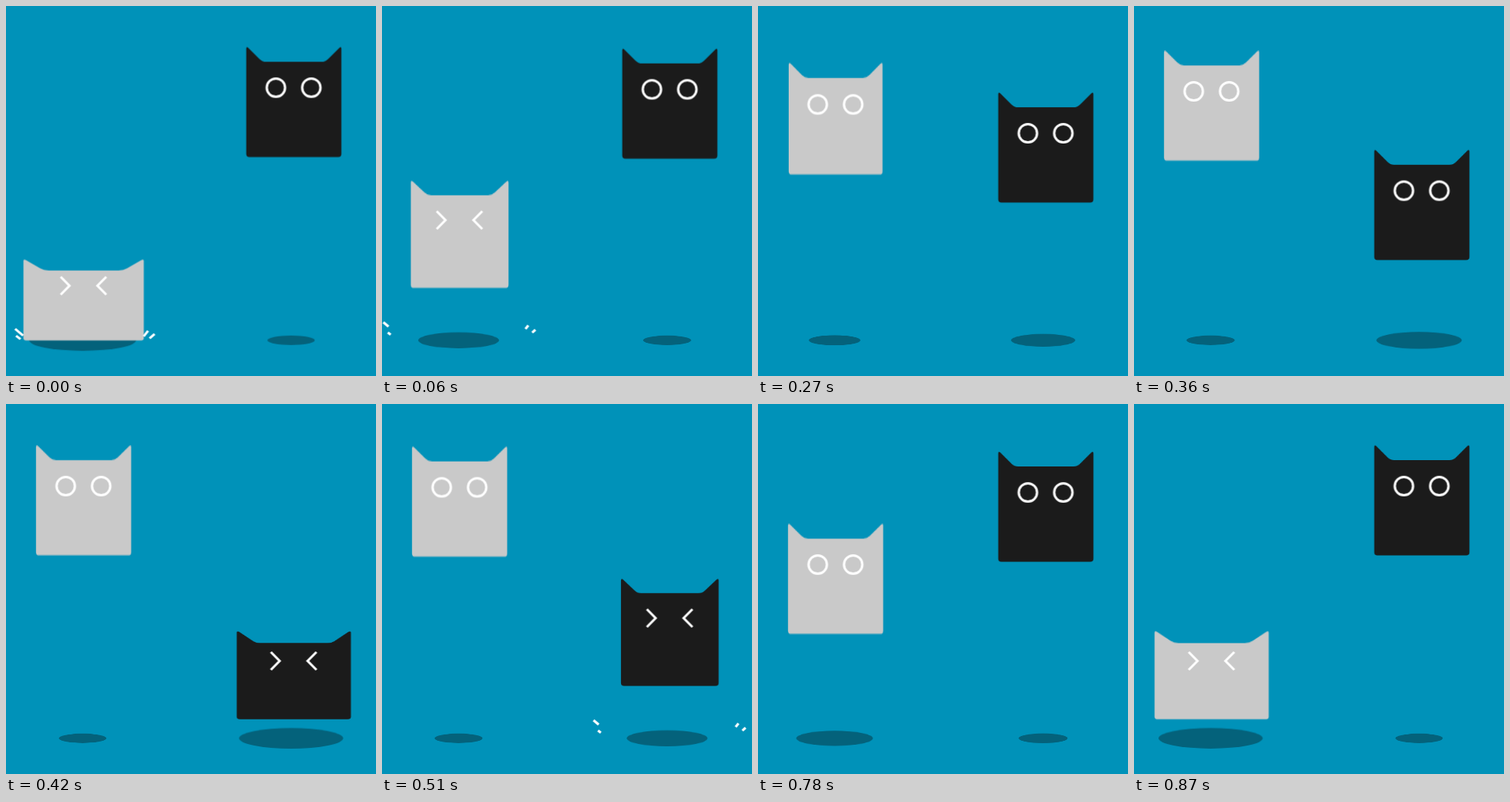
Write an HTML page that moves like this. It is 469 px wide and 468 px high and loops after 900 ms.

```html
<!DOCTYPE html>
<html lang="en">
<head>
<meta charset="utf-8">
<title>Two jumping cats</title>
<style>
  html, body { margin: 0; width: 100%; height: 100%; overflow: hidden; background: #0092b9; }
  svg { display: block; width: 100%; height: 100%; }
  .line { fill: none; stroke: #fff; stroke-width: 3; }
  .shadow { fill: #04627b; }
</style>
</head>
<body>
<svg id="stage" viewBox="0 0 469 468"></svg>
<script>
const LOOP = 900;
const APEX = 121.5, FLOOR = 372, GROUND = 422.8;
const NS = 'http://www.w3.org/2000/svg';
const stage = document.getElementById('stage');

const BODY = 'M-60.3 -67.5 Q-60.3 -71 -57.6 -68.6 L-43.5 -54.6 Q-40 -51 -35 -51' +
  ' H35 Q40 -51 43.5 -54.6 L57.6 -68.6 Q60.3 -71 60.3 -67.5' +
  ' V65.6 Q60.3 69.6 56.3 69.6 H-56.3 Q-60.3 69.6 -60.3 65.6 Z';
const SHUT = 'M-28.9 -11.2 L-17.8 0 L-28.9 11.2 M28.9 -11.2 L17.7 0 L28.9 11.2';

// Dust strokes: x, y, dx, dy relative to the cat's middle
const DUST = [
  [-76.5, 417, -20.2, -17],
  [-80, 421.5, -11, -8.5],
  [76, 418, 11, -14],
  [83.5, 420.5, 12.5, -11]
];

function add(parent, tag, attrs = {}) {
  const el = document.createElementNS(NS, tag);
  for (const k in attrs) el.setAttribute(k, attrs[k]);
  return parent.appendChild(el);
}

// steps: [time in ms, value, easing to the next step]
function play(el, prop, steps, start) {
  const frames = steps.map(([ms, value, easing = 'linear']) =>
    ({ offset: ms / LOOP, [prop]: value, easing }));
  el.animate(frames, { duration: LOOP, iterations: Infinity, iterationStart: start });
}

const moveY = y => `translate(0px, ${y}px)`;
const scale = (x, y = x) => `scale(${x}, ${y})`;
const EASE = 'cubic-bezier(.33, 0, .67, 1)';

const JUMP = [
  [0, moveY(FLOOR), 'cubic-bezier(.11, 0, .11, 1)'],
  [450, moveY(APEX), 'cubic-bezier(.89, 0, .89, 1)'],
  [900, moveY(FLOOR)]
];
const SQUASH = [
  [0, scale(1.265, .735), EASE],
  [120, scale(.8, 1.2), EASE],
  [300, scale(1)],
  [810, scale(1), EASE],
  [900, scale(1.265, .735)]
];
const SHADE = [
  [0, scale(2.26), 'cubic-bezier(.07, 0, .03, 1)'],
  [450, scale(1), 'cubic-bezier(.82, 0, .82, 1)'],
  [900, scale(2.26)]
];
const blink = (shut, open) =>
  [[0, shut], [165, shut], [165, open], [825, open], [825, shut], [900, shut]];

function cat(x, color, shadowX, start) {
  const root = add(stage, 'g', { transform: `translate(${x} 0)` });

  const ground = add(root, 'g', { transform: `translate(${shadowX} ${GROUND})` });
  const shadow = add(ground, 'ellipse', { class: 'shadow', rx: 30, ry: 5.9 });
  play(shadow, 'transform', SHADE, start);

  const jumper = add(root, 'g');
  play(jumper, 'transform', JUMP, start);
  const body = add(jumper, 'path', { d: BODY, fill: color });
  play(body, 'transform', SQUASH, start);

  const eyes = add(jumper, 'g', { class: 'line', transform: 'translate(-.2 -18.2)' });
  const open = add(eyes, 'g');
  for (const cx of [-22.5, 22.4]) add(open, 'circle', { cx, cy: 0, r: 11.6 });
  const shut = add(eyes, 'path', { d: SHUT });
  play(open, 'opacity', blink(0, 1), start);
  play(shut, 'opacity', blink(1, 0), start);

  for (const [dx, dy, w, h] of DUST) {
    const dash = add(root, 'path', {
      class: 'line', d: `M${dx} ${dy} l${w} ${h}`,
      pathLength: 1, 'stroke-dasharray': '.5 2'
    });
    play(dash, 'strokeDashoffset', [[0, '0'], [90, '-1'], [900, '-1']], start);
  }
}

cat(98.4, '#c9c9c9', -1.3, 0);
cat(364.8, '#1b1b1b', -3.4, .5);
</script>
</body>
</html>
```
